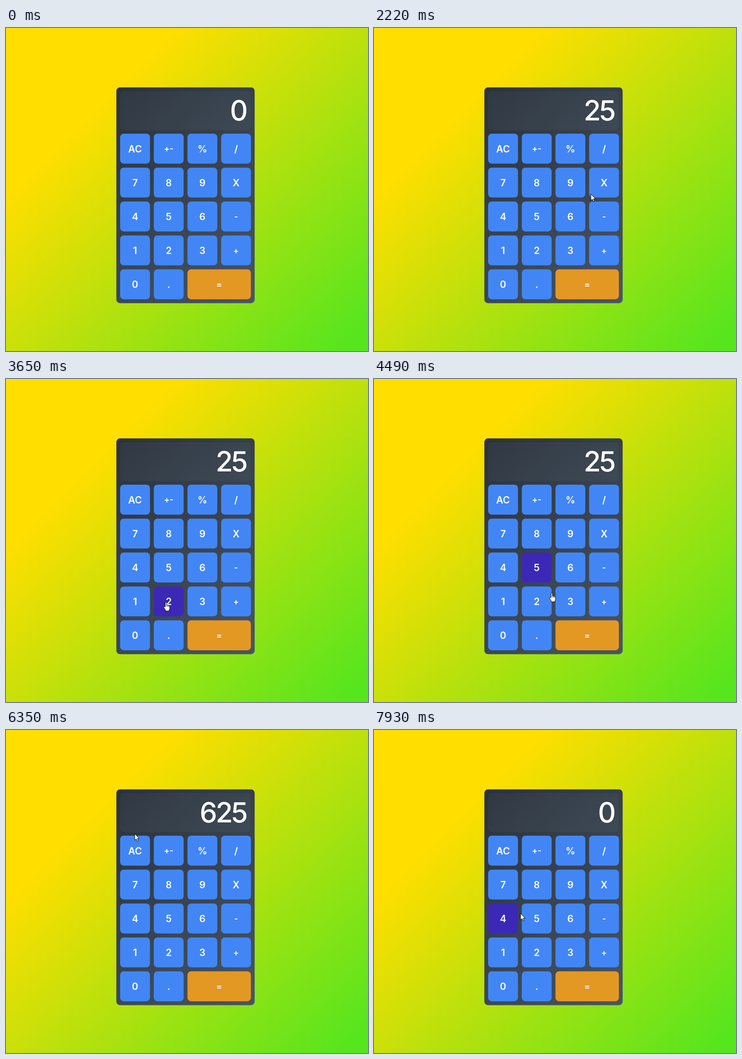
Write an HTML page that moves like this. It is 793x706 px and loops after 8000 ms.

```html
<!DOCTYPE html>
<html lang="en">
<head>
<meta charset="utf-8">
<title>Calculator</title>
<style>
  html, body { margin: 0; width: 100%; height: 100%; overflow: hidden; }
  svg { display: block; width: 100%; height: 100%; }
  text { fill: #fff; font-family: Inter, "Open Sans", sans-serif; }
  .key { font-size: 21px; font-weight: 600; text-anchor: middle; }
  .sign { font-size: 18.5px; }
  #display { font-size: 61px; font-weight: 500; text-anchor: end; letter-spacing: -3.5px; }
  .cursor { fill: #fff; stroke: #000; stroke-width: 1; stroke-linejoin: round; }
</style>
</head>
<body>
<svg id="stage" viewBox="0 0 793 706" preserveAspectRatio="none">
  <defs>
    <linearGradient id="sky" gradientUnits="userSpaceOnUse" x1="21.75" y1="-21.75" x2="771.25" y2="727.75">
      <stop offset=".25" stop-color="#ffde00"/>
      <stop offset=".96" stop-color="#57e51e"/>
    </linearGradient>
    <linearGradient id="shell" gradientUnits="userSpaceOnUse" x1="200" y1="172" x2="587" y2="559">
      <stop offset="0" stop-color="#29323c"/>
      <stop offset="1" stop-color="#485563"/>
    </linearGradient>
  </defs>
  <rect width="793" height="706" fill="url(#sky)"/>
  <rect x="241.7" y="129.8" width="303" height="471.6" rx="8" fill="url(#shell)"/>
  <rect x="250" y="138" width="286.3" height="85" rx="8" fill="#fff" fill-opacity=".03"/>
  <text id="display" x="526.5" y="202.3">0</text>
  <g id="keys"></g>
  <g id="pointer">
    <path id="arrow" class="cursor" d="M0 0V14.2L3.3 11.2 5.6 16.6 8 15.6 5.7 10.3H10.1Z"/>
    <g id="hand">
      <path class="cursor" d="M-2 9.6V1.5Q-2 0-.5 0T1 1.5V6.2Q2.6 5.4 3.3 6.8 5 6 5.6 7.5 7.8 7 7.8 9.2V13Q7.8 15.5 6.3 17V19H-1.8V17Q-3.5 15-5.2 11.6-5.6 9.4-3.8 9.2Z"/>
      <path d="M1 6V10M3.4 7V10M5.7 8V10.5" fill="none" stroke="#000" stroke-width=".7"/>
    </g>
  </g>
</svg>
<script>
const LOOP = 8000;
const $ = id => document.getElementById(id);

function add(parent, tag, attrs) {
  const el = document.createElementNS('http://www.w3.org/2000/svg', tag);
  for (const name in attrs) el.setAttribute(name, attrs[name]);
  return parent.appendChild(el);
}

// Key pad
const rows = ['AC +- % /', '7 8 9 X', '4 5 6 -', '1 2 3 +', '0 . ='];
const keys = {};
rows.forEach((row, r) => row.split(' ').forEach((label, c) => {
  const x = 250 + c * 73.75, y = 231 + r * 74.13;
  const width = label === '=' ? 139 : 65.4;
  const sign = '+-='.includes(label);
  keys[label] = add($('keys'), 'rect', { x, y, width, height: 65.4, rx: 8 });
  add($('keys'), 'text', {
    class: sign ? 'key sign' : 'key',
    x: x + width / 2,
    y: y + 32.7 + (sign ? 6.6 : 7.8)
  }).textContent = label;
}));

// Bursts of movement: start, end
const bursts = [
  [70, 830], [900, 1670], [1940, 2430], [2760, 2890], [3090, 3650], [3930, 4700],
  [4770, 5110], [5510, 6270], [6350, 6680], [6950, 7720], [7790, 7930]
];

// Pointer tip: time, x, y
const path = [
  [70, 682, 688], [350, 270, 628], [490, 174, 590], [830, 240, 510],
  [1040, 325, 476], [1180, 352, 478], [1390, 352, 478], [1600, 357, 405],
  [2010, 358, 405], [2220, 475, 363], [2430, 506, 335], [2760, 507, 335],
  [3090, 505, 341], [3440, 398, 444], [3650, 351, 488],
  [4000, 351, 487], [4210, 356, 418], [4350, 358, 419], [4700, 448, 561],
  [5110, 458, 570], [5510, 460, 572], [5717, 300, 621], [5993, 144, 410],
  [6201, 215, 262], [6350, 282, 227], [6431, 282, 227], [6680, 281, 256],
  [6950, 276, 259], [7370, 124, 335], [7720, 221, 387], [7930, 321, 401]
];

// Time, lit key, pointer shape
const hovers = [
  [0, '', ''], [70, '', 'arrow'], [900, '', 'hand'], [970, '1', 'hand'],
  [1040, '', 'hand'], [1110, '2', 'hand'], [1530, '5', 'hand'],
  [2150, '6', 'hand'], [2220, '', 'arrow'], [2290, 'X', 'hand'],
  [3300, '6', 'hand'], [3510, '', 'arrow'], [3580, '2', 'hand'],
  [4140, '5', 'hand'], [4560, '3', 'hand'], [4630, '=', 'hand'],
  [5648, '', 'arrow'], [6470, 'AC', 'hand'], [7090, '', 'arrow'],
  [7790, '4', 'hand'], [7930, '4', 'arrow']
];

const readings = [
  [0, '0'], [1250, '2'], [1940, '25'], [3930, '2'], [4280, '25'], [4940, '625'], [6597, '0']
];

const latest = (list, t) => list.findLast(item => item[0] <= t);

// The pointer is seen about every 70 ms and rests between bursts
function stepped(t) {
  const burst = latest(bursts, t);
  if (!burst) return t;
  const [start, end] = burst;
  const step = (end - start) / Math.round((end - start) / 70);
  return Math.min(end, start + Math.floor((t - start + 1) / step) * step);
}

const slope = (i, axis) =>
  (path[i + 1][axis] - path[i][axis]) / (path[i + 1][0] - path[i][0]);

// Tangent that never overshoots the points
function tangent(i, axis) {
  if (i === 0) return slope(0, axis);
  if (i === path.length - 1) return slope(i - 1, axis);
  const a = slope(i - 1, axis), b = slope(i, axis);
  return a * b > 0 ? 2 * a * b / (a + b) : 0;
}

function tip(t) {
  const last = path.length - 1;
  if (t <= path[0][0]) return path[0].slice(1);
  if (t >= path[last][0]) return path[last].slice(1);
  const i = path.findIndex(p => p[0] > t) - 1;
  const span = path[i + 1][0] - path[i][0];
  const k = (t - path[i][0]) / span, m = 1 - k;
  return [1, 2].map(axis =>
    m * m * (1 + 2 * k) * path[i][axis] + k * k * (3 - 2 * k) * path[i + 1][axis] +
    span * k * m * (m * tangent(i, axis) - k * tangent(i + 1, axis)));
}

function draw(t) {
  const [, lit, shape] = latest(hovers, t);
  for (const label in keys) {
    const on = label === lit;
    const fill = label === '=' ? (on ? '#e4270f' : '#e49824') : (on ? '#3c28b7' : '#4286f5');
    keys[label].setAttribute('fill', fill);
  }
  $('display').textContent = latest(readings, t)[1];
  for (const id of ['arrow', 'hand']) {
    $(id).setAttribute('visibility', id === shape ? 'visible' : 'hidden');
  }
  const [x, y] = tip(stepped(t)).map(Math.round);
  $('pointer').setAttribute('transform', `translate(${x} ${y})`);
}

const begin = performance.now();
function tick() {
  draw((performance.now() - begin) % LOOP);
  requestAnimationFrame(tick);
}
draw(0);
requestAnimationFrame(tick);
</script>
</body>
</html>
```
